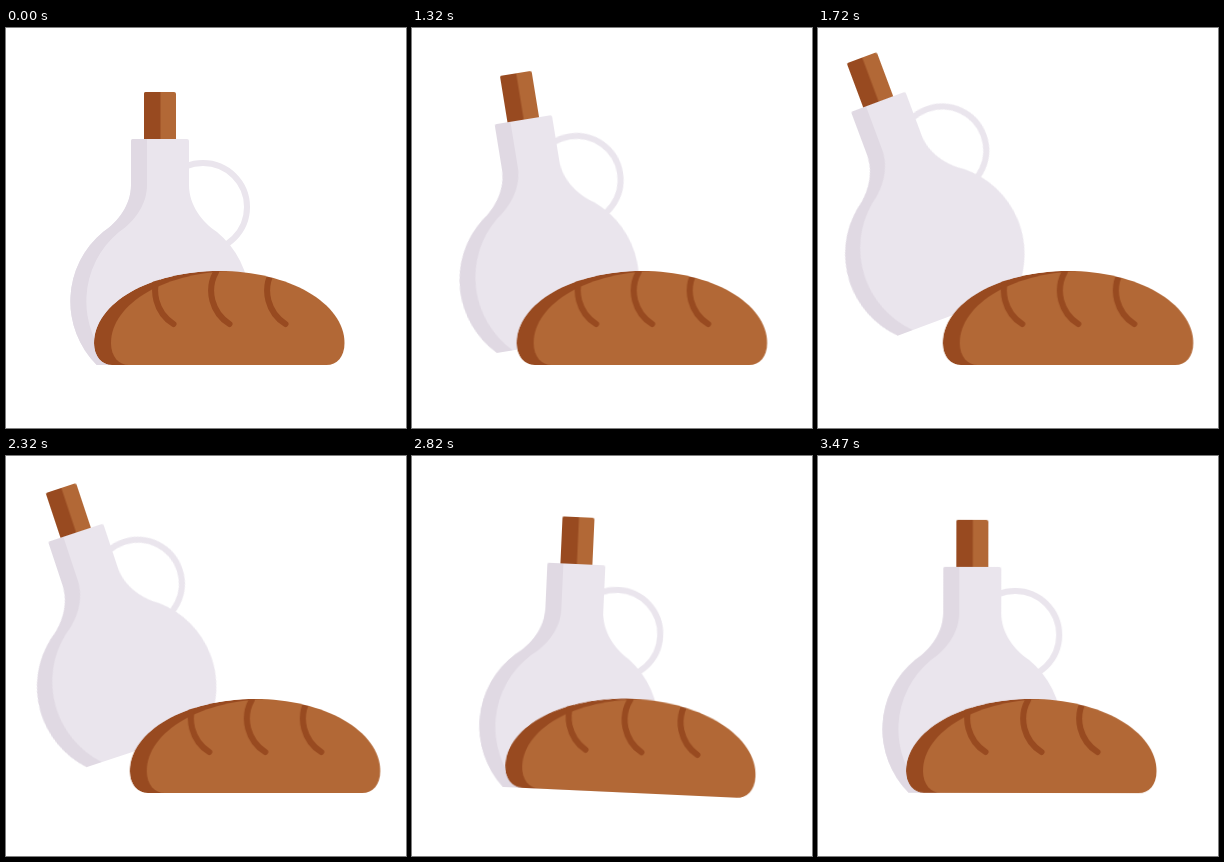
Write an HTML page that moves like this. It is 400 px wide and 400 px high and loops after 3.5 s.

```html
<!DOCTYPE html>
<html lang="en">
<head>
<meta charset="utf-8">
<title>Bottle and bread</title>
<style>
  html, body { margin: 0; width: 100%; height: 100%; overflow: hidden; background: #fff; }
  svg { display: block; width: 100%; height: 100%; }

  .scene, .bottle, .bread { animation: 3500ms linear infinite; }
  .scene  { animation-name: tilt;  transform-origin: 222px 338px; }
  .bottle { animation-name: lean;  transform-origin: 154px 273px; }
  .bread  { animation-name: slide; }

  .glass { fill: #eae5ed; }
  .glass-shade { fill: #e0d9e3; }
  .crust { fill: #b26836; }
  .crust-shade { fill: #984a20; }
  .handle { fill: none; stroke: #eae5ed; stroke-width: 6; }
  .cut { fill: none; stroke: #984a20; stroke-width: 6; stroke-linecap: round; }

  @keyframes lean {
    0%, 28.571% { transform: none; animation-timing-function: cubic-bezier(.3, 0, .33, 1); }
    57.143% { transform: translate(-40px, -51px) rotate(-22deg); }
    60% {
      transform: translate(-40px, -51px) rotate(-22deg);
      animation-timing-function: cubic-bezier(.45, 0, .6, 1);
    }
    81.143%, 100% { transform: none; }
  }
  @keyframes slide {
    0%, 28.571% { transform: none; animation-timing-function: cubic-bezier(.3, 0, .33, 1); }
    57.143% { transform: translateX(39.5px); }
    60% { transform: translateX(39.5px); animation-timing-function: cubic-bezier(.5, 0, .8, 1); }
    83.714%, 100% { transform: none; }
  }
  @keyframes tilt {
    0%, 74.286% { transform: none; animation-timing-function: cubic-bezier(.333, 0, .667, 1); }
    88% { transform: rotate(6deg); animation-timing-function: cubic-bezier(.333, 0, .667, 1); }
    100% { transform: none; }
  }
</style>
</head>
<body>
<svg viewBox="0 0 400 400">
  <defs>
    <path id="loaf" d="M106 337C96 337 88 329 88 315C88 275 144 243 213.25 243S338.5 275 338.5 315C338.5 329 331 337 320.500 337Z"/>
    <path id="flask" d="M127 111H181Q183 111 183 113V157C183 177 196 194 211 204A90 90 0 0 1 217.300 337H90.700A90 90 0 0 1 97 204C112 194 125 177 125 157V113Q125 111 127 111Z"/>
    <path id="cut" d="M210 244C200 262 206 285 223.500 296"/>
    <clipPath id="in-loaf"><use href="#loaf"/></clipPath>
  </defs>
  <g class="scene">
    <g class="bottle">
      <circle class="handle" cx="197" cy="179" r="44"/>
      <rect class="crust" x="138" y="64" width="32" height="49" rx="2"/>
      <path class="crust-shade" d="M154.500 64V113H138V66Q138 64 140 64Z"/>
      <use class="glass" href="#flask"/>
      <path class="glass-shade" d="M127 111H141V157C141 177 128 194 113 204A90 90 0 0 0 106.700 337H90.700A90 90 0 0 1 97 204C112 194 125 177 125 157V113Q125 111 127 111Z"/>
    </g>
    <g class="bread">
      <g clip-path="url(#in-loaf)">
        <use class="crust-shade" href="#loaf"/>
        <use class="crust" href="#loaf" x="17"/>
        <use class="cut" href="#cut" x="-56"/>
        <use class="cut" href="#cut"/>
        <use class="cut" href="#cut" x="56"/>
      </g>
    </g>
  </g>
</svg>
</body>
</html>
```
